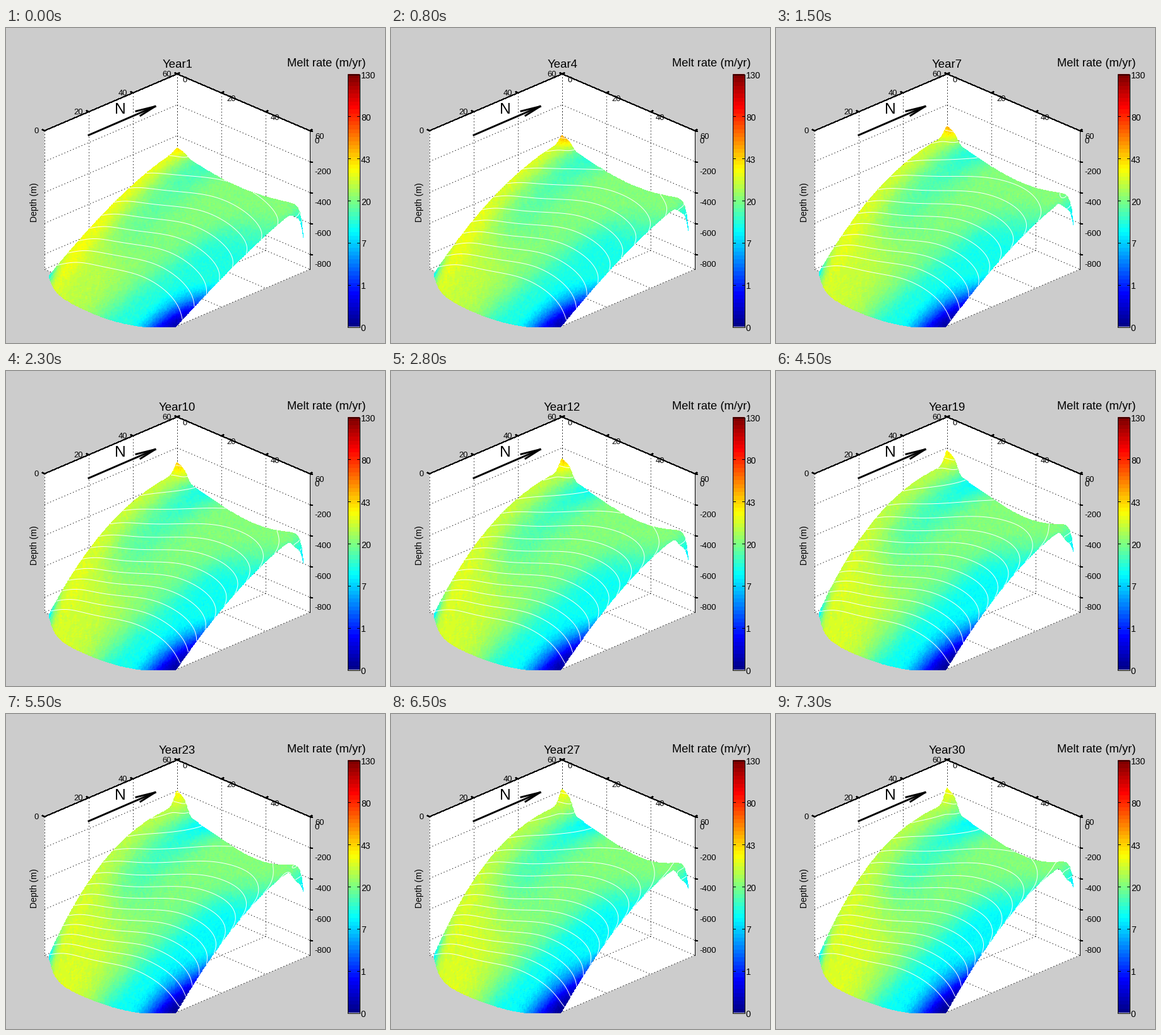
Write a matplotlib script that moves like this. It is 600 px wide and 500 px high and loops after 7.5 s.

```python
import numpy as np
import matplotlib.pyplot as plt
from matplotlib.animation import FuncAnimation
from matplotlib.colors import LinearSegmentedColormap
from matplotlib.patches import Polygon, Rectangle

plt.rcParams["font.family"] = "Liberation Sans"
FRAMES, INTERVAL, YEARS = 75, 100, 30

fig = plt.figure(figsize=(6, 5), dpi=100, facecolor="#cccccc")
ax = fig.add_axes([0, 0, 1, 1])
ax.axis("off")

JET = LinearSegmentedColormap.from_list("jet64", [
    (0, (0, 0, .55)), (.125, (0, 0, 1)), (.375, (0, 1, 1)),
    (.625, (1, 1, 0)), (.875, (1, 0, 0)), (1, (.5, 0, 0))], N=64)

# s runs along the right wall, t along the left wall, both away from the back corner.
S, T = np.meshgrid(np.linspace(.6, 57.6, 136), np.linspace(.6, 58.6, 136))
grain = np.random.default_rng(4).normal(0, .01, S.shape)


def smooth(x):
    x = np.clip(x, 0, 1)
    return x * x * (3 - 2 * x)


right_end = np.exp(-(57.6 - S) / 1.2)
right_tip = right_end * np.exp(-(T - .6))
right_lobe = right_end * np.exp(-(T / 5.5) ** 4)
left_tip = np.exp(-(S - .6) / .7 - (58.6 - T) / 3)
peak = np.exp(-((S - 1.5) / 4) ** 4 - (T / 2.3) ** 2)


def depth_shape(back, tilt, sag, skew, ridge, bend, left_bend, right_bend,
                drop, summit, lobe, tip):
    """Ice base in metres: a back profile bending down to a deep front edge."""
    back = (back - tilt * S + sag * np.sin(np.pi * (S / 57.6) ** skew)
            - ridge * np.exp(-S / 4))
    front = 1062 - .096 * (S - 20) ** 2 - drop * np.exp(-S / 2)
    power = (bend + left_bend * np.exp(-(S / 18) ** 3)
             + right_bend * np.exp((S - 57) / 4))
    return (back + (front - back) * (T / 58) ** power
            - summit * peak + lobe * right_lobe + tip * right_tip)


def color_shape(edge, stripe, pool, channel):
    """Colour level: warm left side, cool stripe and channel, blue front corner."""
    level = .505 + edge * np.exp(-(S / 5) ** 2)
    level = level - stripe * np.exp(-((S - 12) / 6) ** 2 - T / 28)
    level = level + pool * np.exp(-((S - 11) / 10) ** 2) * smooth((T - 28) / 22)
    bank = 1 / (1 + np.exp((40 - .25 * T - S) / 3))
    level = level - channel * bank * smooth((T - 3) / 24)
    level = level - .36 * smooth((S - 36) / 22) * smooth((T - 36) / 22)
    return level - .2 * right_end * np.exp(-T / 4) - .28 * left_tip ** .7 + grain


depth_ends = (
    depth_shape(back=490, tilt=0, sag=60, skew=1, ridge=0, bend=1.1, left_bend=.38,
                right_bend=.15, drop=120, summit=22, lobe=50, tip=165),
    depth_shape(back=315, tilt=.5, sag=104, skew=1.5, ridge=50, bend=1.3, left_bend=1.2,
                right_bend=.4, drop=190, summit=105, lobe=120, tip=60))
color_ends = (color_shape(edge=.10, stripe=.07, pool=.06, channel=.10),
              color_shape(edge=.05, stripe=.14, pool=.10, channel=.13))
rate = .1 - .045 * S / 57


def field(year):
    """Each place relaxes to its final state, the left side fastest."""
    age = year - 1
    w = (1 - np.exp(-rate * age)) / (1 - np.exp(-rate * (YEARS - 1)))
    depth, color = (a + (b - a) * w for a, b in (depth_ends, color_ends))
    heat = .06 + .12 * (1 - np.exp(-age / 2)) * np.exp(-age / 14)
    return depth, color + heat * peak


def project(s, t, depth):
    return 271 + 3.5 * (s - t), 73 + 1.5 * (s + t) + .245 * depth


def line(p, q, dotted=False):
    ax.plot(*zip(p, q), color="k", lw=.72, ls=(0, (1.3, 3.6)) if dotted else "-",
            zorder=1, dash_capstyle="butt", solid_capstyle="butt", antialiased=dotted)


def label(x, y, text, size, ha="left"):
    return ax.text(x, y + .36 * size, text, size=size * .72, ha=ha, va="baseline", zorder=6)


def draw_box():
    floor = 898
    corners = [project(0, 60, 0), project(0, 0, 0), project(60, 0, 0),
               project(60, 0, floor), project(60, 60, floor), project(0, 60, floor)]
    ax.add_patch(Polygon(corners, fc="w", ec="none", zorder=0))
    for v in (0, 20, 40, 60):
        line(project(0, v, 0), project(0, v, floor), True)
        line(project(v, 0, 0), project(v, 0, floor), v < 60)
        line(project(v, 0, floor), project(v, 60, floor), True)
        line(project(0, v, floor), project(60, v, floor), True)
        x, y = project(0, v, 0)
        line((x, y), (x - 4, y - 2))
        label(x - 9, y - 1, str(60 - v), 13, "right")
        x, y = project(v, 0, 0)
        line((x, y), (x + 4, y - 2))
        label(x + 8, y + 8, str(v), 13)
    for d in range(0, 801, 200):
        back, right = project(0, 0, d), project(60, 0, d)
        line(project(0, 60, d), back, d > 0)
        line(back, right, d > 0)
        line(right, (right[0] + 4, right[1] + 1.5))
        label(right[0] + 7.5, right[1] + 15, str(-d), 13.3)
    ax.text(45.5, 277, "Depth (m)", size=14 * .72, rotation=90, ha="center", va="center")


def draw_arrow():
    label(181, 127, "N", 24.5, "center")
    for x, y in ((131, 170), (206, 132), (213, 139)):
        ax.plot([x, 236], [y, 124.5], color="k", lw=2.1, zorder=5)


def draw_colorbar():
    left, right, top, bottom = 541, 560, 73.5, 474.5
    ax.imshow(np.linspace(1, 0, 64)[:, None], cmap=JET, aspect="auto",
              extent=(left, right, bottom, top), interpolation="nearest", zorder=2)
    ax.add_patch(Rectangle((left, top), right - left, bottom - top,
                           fc="none", ec="k", lw=.72, zorder=4))
    for k, melt in enumerate((0, 1, 7, 20, 43, 80, 130)):
        y = bottom - k * (bottom - top) / 6
        for a, b in ((left, left + 4), (right - 4, right)):
            ax.plot([a, b], [y, y], color="k", lw=.72, zorder=4)
        label(562, y + 1.5, str(melt), 14)
    label(507, 54, "Melt rate (m/yr)", 18.4, "center")


draw_box()
draw_arrow()
draw_colorbar()
ax.set(xlim=(0, 600), ylim=(500, 0))
title = label(271, 56, "", 18.7, "center")
window = Rectangle((61, 73), 420, 401.5, transform=ax.transData)
parts = []


def update(frame):
    cycle, step = divmod(frame, 5)
    year = 2 * cycle + 1 + (step >= 3)
    name = f"Year{year}"
    if title.get_text() == name:
        return
    title.set_text(name)
    while parts:
        parts.pop().remove()
    depth, color = field(year)
    x, y = project(S, T, depth)
    cells = (color[1:, 1:] + color[:-1, :-1]) / 2
    parts.append(ax.pcolormesh(x, y, cells, cmap=JET, vmin=0, vmax=1,
                               antialiased=False, zorder=2))
    parts.append(ax.contour(x, y, depth, levels=np.arange(200, 901, 50),
                            colors="w", linewidths=.7, zorder=3))
    for part in parts:
        part.set_clip_path(window)


anim = FuncAnimation(fig, update, frames=FRAMES, interval=INTERVAL,
                     init_func=lambda: None, repeat=True, repeat_delay=0)
plt.show()
```
